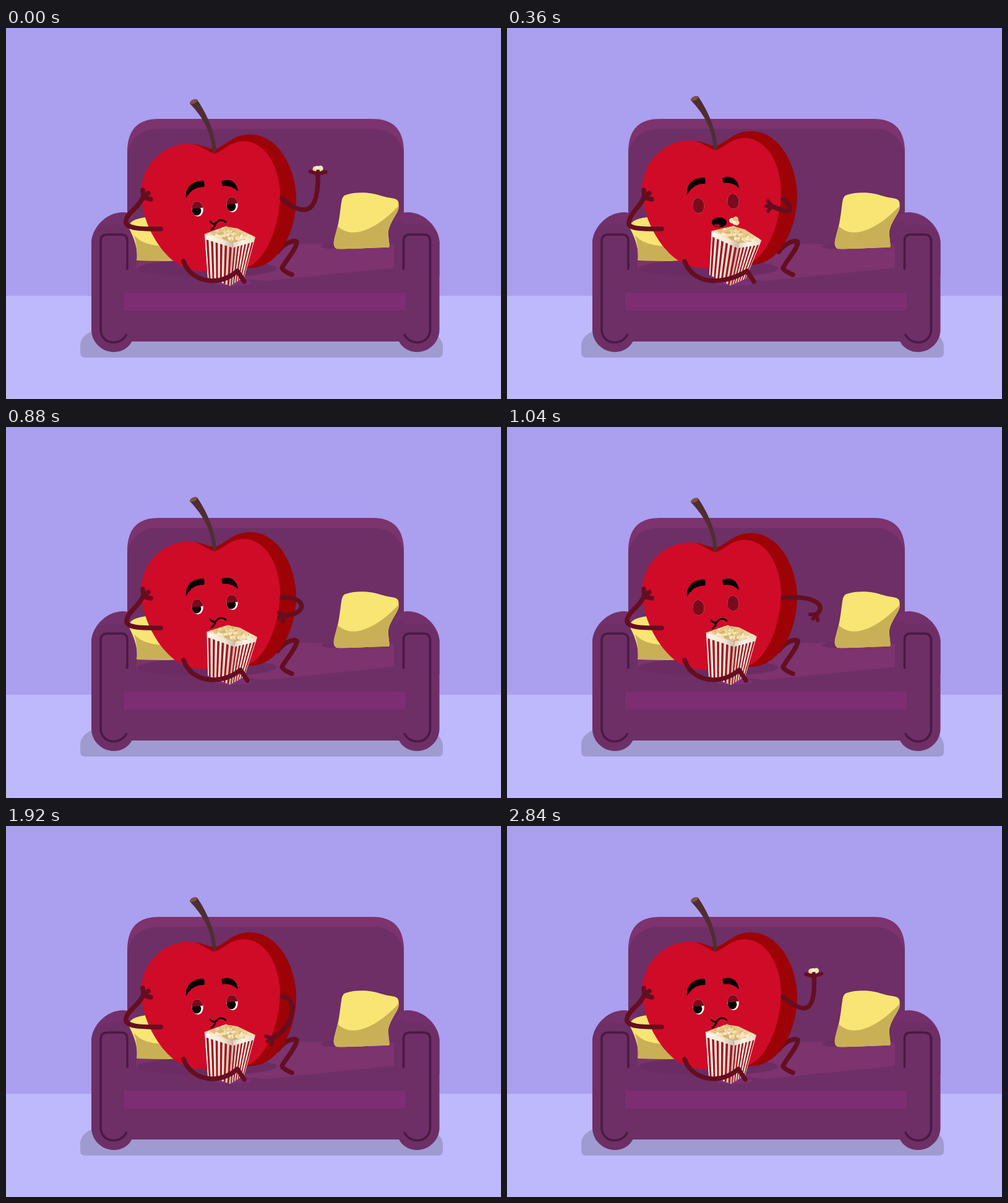
An HTML page for the animation above (2.88 s loop, 800 by 600 pixels).

```html
<!DOCTYPE html>
<html lang="en">
<head>
<meta charset="utf-8">
<title>Snack on the sofa</title>
<style>
  html, body { margin: 0; width: 100%; height: 100%; overflow: hidden; background: #ab9ff0; }
  svg { display: block; width: 100%; height: 100%; }
  .limb { fill: none; stroke: #650e20; stroke-width: 7.5; stroke-linecap: round; stroke-linejoin: round; }
  .dark { fill: #6d2f66; }
  .lite { fill: #7c336e; }
  .lid { fill: #790b1b; }
  #hand { stroke-width: 6; }
</style>
</head>
<body>
<svg viewBox="0 0 800 600">
  <defs>
    <clipPath id="eyeClip"><ellipse rx="9.3" ry="12.3"/></clipPath>
    <linearGradient id="front">
      <stop offset="0" stop-color="#fffaf0"/><stop offset=".65" stop-color="#f1e6d6"/><stop offset="1" stop-color="#c9bbab"/>
    </linearGradient>
    <linearGradient id="side">
      <stop offset="0" stop-color="#d8cbbb"/><stop offset=".5" stop-color="#fbf4e8"/><stop offset="1" stop-color="#e6dac9"/>
    </linearGradient>
    <g id="kernel">
      <circle cx="-4" cy="-1" r="4.6" fill="#f0d9a0"/>
      <circle cx="4" cy="-2" r="4.4" fill="#f6e6bd"/>
      <circle cy="3" r="4.4" fill="#e3c386"/>
      <circle cx="-1" cy="-3" r="3" fill="#fcf2d6"/>
    </g>
    <g id="armrest">
      <path fill="#73306a" d="M138 345C139 325 160 298 190 298Q211 299 211 316V400H138Z"/>
      <path class="dark" d="M138 345Q144 319 166 318H190Q207 319 207 340V495C205 512 192 524 174 524C155 524 138 508 138 488Z"/>
      <path class="dark" d="M196 312L211 318V430H196Z"/>
      <path fill="none" stroke="#4b1943" stroke-width="3.6" d="M196 391V344Q196 334 186 334H164Q153 334 153 345V487C153 512 185 516 195 495"/>
    </g>
  </defs>

  <rect y="433" width="800" height="167" fill="#beb8fd"/>
  <rect width="800" height="433" fill="#ab9ff0"/>
  <path fill="#9f9bd0" d="M140 490Q120 498 120 514V525Q120 533 128 533H698Q706 533 706 525V514Q704 500 690 492Z"/>

  <path class="lite" d="M196 420V197Q198 147 246 147H593Q641 147 643 197V420Z"/>
  <path class="dark" d="M196 420V204Q204 164 246 163H593Q635 164 643 204V420Z"/>
  <rect class="dark" x="180" y="376" width="480" height="131"/>
  <path class="lite" d="M211 377L480 349L627 350V388L420 409L211 391Z"/>
  <path fill="#6b2c63" d="M508 354Q515 346 536 348L545 357H520Z"/>
  <use href="#armrest"/>
  <use href="#armrest" transform="translate(838.5) scale(-1 1)"/>
  <rect x="191" y="428" width="455" height="29" fill="#7d2e72"/>

  <path fill="#f9e573" d="M549 270C568 264 590 266 605 271C620 276 632 274 634 281C638 294 622 310 618 328C617 340 621 350 619 355C590 355 560 358 534 357C527 352 530 344 533 332C540 310 540 290 543 277Q545 271 549 270Z"/>
  <path fill="#c9b056" d="M536 320C554 340 592 333 635 287C636 299 622 310 618 328C617 340 621 350 619 355C590 355 560 358 534 357C526 351 531 341 536 320Z"/>
  <path fill="#f9e573" d="M198 322Q200 309 226 306L300 340L275 377L212 376C213 355 207 340 198 322Z"/>
  <path fill="#c9b056" d="M207 335C220 350 240 354 290 354L280 377L211 376Q213 355 207 335Z"/>
  <ellipse cx="325" cy="389" rx="113" ry="14" fill="#6b2c63"/>
  <ellipse cx="366" cy="412" rx="31" ry="5" fill="#7d2f78"/>

  <path class="limb" d="M439 362C450 347 466 342 470 346C470 357 452 376 446 388Q446 392 462 399"/>

  <g id="body">
    <path fill="#9c0206" d="M302 188C316 188 324 195 338 196C356 190 367 172 394 172C440 172 469 226 469 278C468 332 440 386 398 388L340 390Z"/>
    <path fill="#cf0b28" d="M337 203C322 199 313 187 296 187C254 187 218 222 218 268C220 322 257 376 288 387C305 395 330 395 350 391C370 391 385 390 396 384C421 370 442 322 443 272C443 225 420 184 385 183C359 184 353 199 337 203Z"/>
    <path fill="#4f2d31" d="M334 202C333 171 320 146 297 122Q300 114 309 116C325 140 337 166 340 200Q337 203 334 202Z"/>
    <ellipse cx="303" cy="119" rx="6.5" ry="3.2" fill="#7d5148" transform="rotate(-25 303 119)"/>
    <path d="M291 275C289 258 301 247 319 247Q322 251 320 257C306 257 298 263 291 275Z"/>
    <path d="M348 248C360 242 373 248 375 264C367 257 359 254 350 256Z"/>
    <g id="eyes"></g>
    <g id="shut" fill="none" stroke="#160507" stroke-width="2.8" stroke-linecap="round">
      <path d="M330 313C334 318 338 318 341 314C345 309 351 310 355 314M339 315Q338 322 332 326"/>
    </g>
    <g id="open">
      <ellipse rx="12" ry="8"/>
      <path fill="#a80d20" d="M-9 5Q-4 0 3 6Q-3 10 -9 5Z"/>
    </g>
  </g>
  <path id="leftArm" class="limb"/>
  <path id="rightArm" class="limb"/>
  <use id="bite" href="#kernel"/>
  <path id="hand" class="limb"/>
  <g id="bucket"></g>
  <path id="leftLeg" class="limb"/>
</svg>
<script>
const $ = id => document.getElementById(id);
const set = (id, name, value) => $(id).setAttribute(name, value);
const LOOP = 2880, STEP = 40, RAD = Math.PI / 180;
const mix = (a, b, k) => a + (b - a) * k;
const mixPt = (p, q, k) => p.map((v, i) => mix(v, q[i], k));
const clamp = k => Math.min(1, Math.max(0, k));
const smooth = k => { k = clamp(k); return k * k * (3 - 2 * k); };
// Rises from a to b, falls from c to d.
const pulse = (t, a, b, c, d) => smooth((t - a) / (b - a)) - smooth((t - c) / (d - c));

// Arm poses: two curve controls, wrist, hand direction.
const up = [472, 298, 506, 314, 504, 236, 272];
const toss = [474, 292, 500, 308, 460, 250, 225];
const flick = [458, 285, 470, 308, 428, 288, 180];
const chew = [470, 274, 464, 312, 402, 306, 180];
const hang = [500, 272, 517, 290, 500, 303, 128];
const out = [510, 272, 530, 276, 529, 300, 100];
const rest = [492, 270, 508, 290, 486, 312, 128];
const reach = [470, 274, 470, 325, 430, 343, 145];
const dig = [470, 274, 472, 322, 396, 336, 170];
const lift = [470, 276, 472, 312, 414, 307, 185];
const raise = [474, 288, 490, 312, 452, 272, 220];
const nearUp = [472, 298, 500, 314, 496, 243, 268];
const moves = [
  [0, up], [240, toss], [360, flick], [540, chew], [680, chew], [1040, hang], [1240, out],
  [1600, rest], [1720, rest], [1920, reach], [2080, dig], [2360, lift],
  [2560, raise], [2840, nearUp], [LOOP, up]
];

// Smooth curve through the timed poses, easing to rest at turning points.
function armAt(t) {
  let i = 0;
  while (i < moves.length - 2 && t >= moves[i + 1][0]) i++;
  const [ta, a] = moves[i], [tb, b] = moves[i + 1];
  const d = tb - ta, k = (t - ta) / d, k2 = k * k, k3 = k2 * k;
  const slope = (n, j) => {
    if (n < 1 || n > moves.length - 2) return 0;
    const [[tl, l], [tm, m], [tr, r]] = moves.slice(n - 1, n + 2);
    const s = (m[j] - l[j]) / (tm - tl), e = (r[j] - m[j]) / (tr - tm);
    return s * e <= 0 ? 0 : 2 * s * e / (s + e);
  };
  return a.map((v, j) => mix(v, b[j], 3 * k2 - 2 * k3)
    + d * ((k3 - 2 * k2 + k) * slope(i, j) + (k3 - k2) * slope(i + 1, j)));
}

function buildEyes() {
  $('eyes').innerHTML = [[309.5, 292.5], [365.5, 285.5]].map(([x, y]) =>
    `<g transform="translate(${x} ${y}) rotate(-6)"><g clip-path="url(#eyeClip)">
      <rect x="-12" y="-14" width="24" height="28" fill="#fff"/>
      <circle cx="-2" cy="3" r="7.6"/>
      <rect class="lid" x="-12" y="-14" width="24" height="13"/></g></g>`).join('');
}

function buildBucket() {
  const tl = [321, 333], tm = [367, 347], tr = [403, 338];
  const bl = [326, 404], bm = [362, 417], br = [385, 403];
  const poly = (pts, fill) => `<polygon points="${pts.join(' ')}" fill="${fill}"/>`;
  const face = (a, b, c, d, fill) => {
    const at = (u, v) => mixPt(mixPt(a, b, u), mixPt(d, c, u), v);
    let s = poly([a, b, c, d], fill);
    for (let i = 0; i < 6; i++) {
      const u = (i + .28) / 6, w = u + .083;
      s += poly([at(u, .12), at(w, .12), at(w, 1), at(u, 1)], '#9f1724');
    }
    return s;
  };
  let seed = 7;
  const rnd = () => (seed = seed * 16807 % 2147483647) / 2147483647;
  const tones = ['#f0d9a0', '#e3c386', '#fbeecb', '#f5e3b5', '#d8b26f'];
  let s = poly([tl, [354, 321], [374, 324], tr, tm], '#e6c88c');
  for (let i = 0; i < 150; i++) {
    const u = rnd();
    const top = u < .38 ? mix(333, 322, u / .38) : mix(322, 338, (u - .38) / .62);
    const low = u < .55 ? mix(335, 346, u / .55) : mix(346, 339, (u - .55) / .45);
    const x = 328 + 70 * u, y = mix(top, low, rnd()), r = 1.4 + 1.5 * rnd();
    s += `<circle cx="${x}" cy="${y}" r="${r}" fill="${tones[i % 5]}"/>`;
  }
  $('bucket').innerHTML = s + face(tl, tm, bm, bl, 'url(#front)') + face(tm, tr, br, bm, 'url(#side)');
}

function drawArm(t) {
  const [ax, ay, bx, by, wx, wy, dir] = armAt(t);
  const held = t >= 2160 || t < 240, flying = t >= 240 && t < 400;
  const finger = (turn, len) => {
    const r = (dir + turn) * RAD;
    return `M${wx} ${wy}l${Math.cos(r) * len} ${Math.sin(r) * len}`;
  };
  const spread = held ? 74 : 52, size = held ? 13 : 10;
  set('rightArm', 'd', `M446 276C${ax} ${ay} ${bx} ${by} ${wx} ${wy}`);
  set('hand', 'd', finger(-spread, size) + finger(0, held ? 4 : 9) + finger(spread, size));

  $('bite').style.display = held || flying ? '' : 'none';
  if (held) {
    set('bite', 'transform', `translate(${wx + 7 * Math.cos(dir * RAD)} ${wy + 7 * Math.sin(dir * RAD)})`);
  } else {
    const p = clamp((t - 240) / 160);
    set('bite', 'transform', `translate(${mix(452, 340, p)} ${mix(248, 317, Math.sin(p * 90 * RAD))}) rotate(${-200 * p})`);
  }
}

function draw(t) {
  const u = t < 480 ? smooth(t / 360) : 1 - smooth((t - 480) / 680);
  set('body', 'transform', `translate(0 ${-5.2 * u})`);
  set('bucket', 'transform', `translate(0 ${-1.2 * u}) rotate(${7 * u} 355 410)`);
  const e = 3 * u, knee = 374 + 14 * u;
  set('leftArm', 'd', `M250 325C225 325 ${190 + e} 326 ${194 + e} ${311 + e}C${196 + e} 298 216 290 222 272` +
    'L221 262M222 273L230 267M222 274L234 277');
  set('leftLeg', 'd', `M287 377C293 395 310 409 335 409C${353 + 5 * u} 408 ${364 + 8 * u} 402 ${knee} 393l11 17`);

  const lid = pulse(t, 200, 300, 420, 540) + pulse(t, 860, 980, 1100, 1220) + pulse(t, 2440, 2520, 2600, 2700);
  document.querySelectorAll('.lid').forEach(r => r.setAttribute('height', mix(13, 28, lid)));
  const gape = pulse(t, 180, 300, 380, 480), agape = gape > .15;
  set('open', 'transform', `translate(343 319.5) scale(1 ${gape})`);
  $('open').style.display = agape ? '' : 'none';
  $('shut').style.display = agape ? 'none' : '';
  drawArm(t);
}

buildEyes();
buildBucket();
const begin = performance.now();
function tick(now) {
  const t = Math.max(0, now - begin) % LOOP;
  draw(Math.floor(t / STEP) * STEP);
  requestAnimationFrame(tick);
}
draw(0);
requestAnimationFrame(tick);
</script>
</body>
</html>
```
